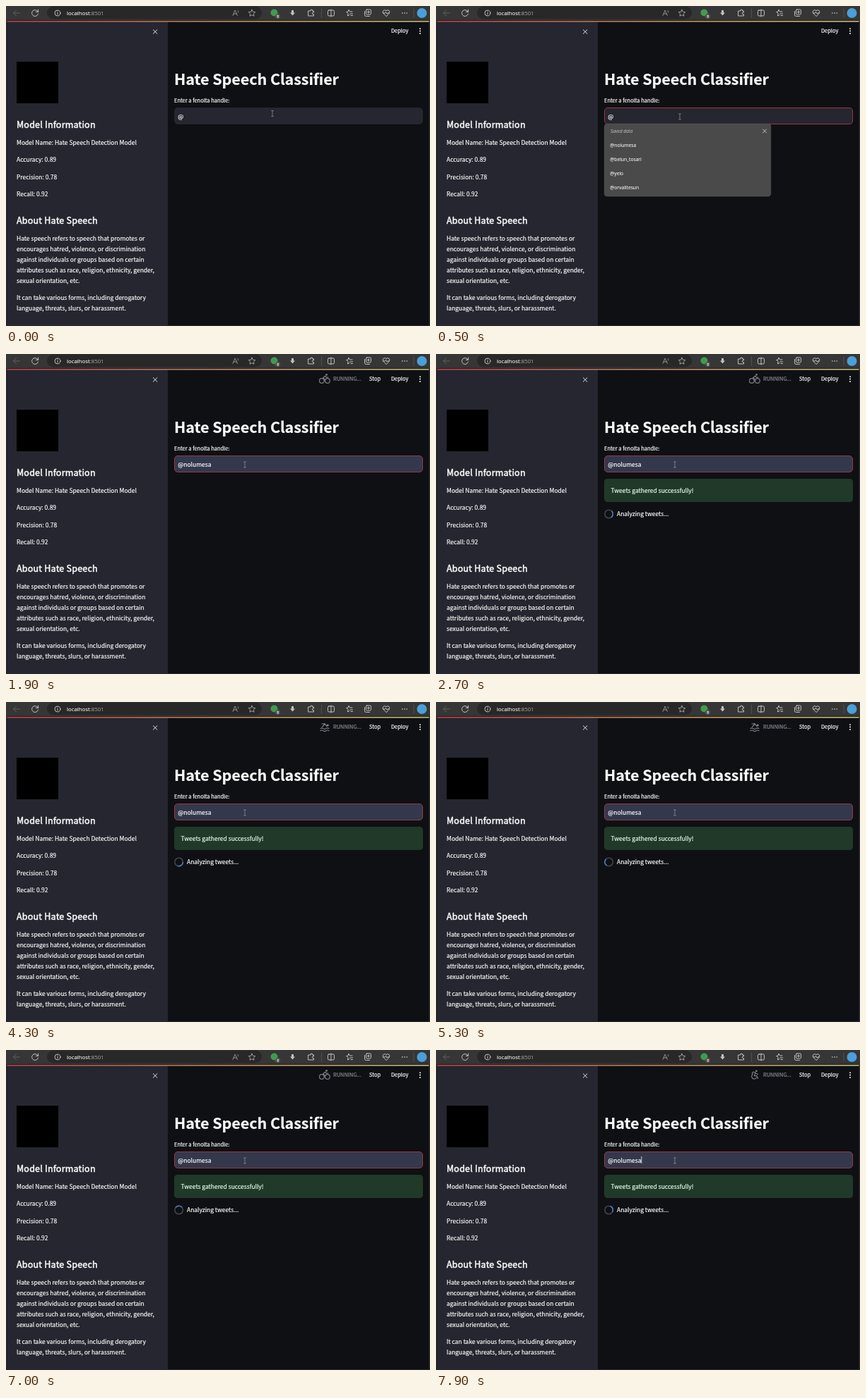
An HTML page for the animation above (8 s loop, 600 by 454 pixels).

```html
<!DOCTYPE html>
<html lang="en">
<head>
<meta charset="utf-8">
<title>Hate Speech Classifier</title>
<style>
html, body { margin: 0; width: 100%; height: 100%; overflow: hidden; background: #2a2a2c; }
svg { display: block; width: 100vw; height: 100vh; }
text { font: 8.47px "Noto Sans CJK JP", "Noto Sans CJK", "Noto Sans CJK SC", "Open Sans", sans-serif; color: #fafafa; fill: currentColor; stroke: currentColor; stroke-width: .2; white-space: pre; }
.small { font-size: 7.45px; }
.h1 { font-size: 21.55px; font-weight: 700; letter-spacing: -.1px; }
.h2 { font-size: 12.5px; letter-spacing: .21px; stroke-width: .5; }
.ui { font: 6.7px "Open Sans", "Noto Sans", sans-serif; stroke-width: .1; }
.line { fill: none; stroke: #d0d0d0; stroke-width: .9; stroke-linecap: round; stroke-linejoin: round; }
.sport { fill: none; stroke: #7c7d83; stroke-width: 1.2; stroke-linecap: round; stroke-linejoin: round; }
.dot { fill: #7c7d83; stroke: none; }
</style>
</head>
<body>
<svg viewBox="0 0 600 454" preserveAspectRatio="none">
  <defs>
    <linearGradient id="rainbow">
      <stop stop-color="#d8434b"/><stop offset=".5" stop-color="#d99a62"/><stop offset="1" stop-color="#dcd880"/>
    </linearGradient>
  </defs>

  <!-- browser toolbar -->
  <rect width="600" height="20.5" fill="#363636"/>
  <rect x="58" y="0.5" width="304" height="18" rx="9" fill="#282828"/>
  <g class="line">
    <path d="M19.5 10H10.5M14.5 6L10.5 10L14.5 14" stroke="#666"/>
    <path d="M45.2 8.2A4.5 4.5 0 1 0 45.5 11M45.6 5.2V8.4H42.4"/>
    <circle cx="73" cy="10" r="4"/><path d="M73 9.5V12M73 7.8V8"/>
    <path d="M321 13.5L324.2 6L327.4 13.5M322 11H326.4M328 6.5Q329.5 7.5 328.6 9" stroke="#999"/>
    <path d="M348 5.2L349.5 8.3L352.8 8.7L350.4 11L351 14.3L348 12.7L345 14.3L345.6 11L343.2 8.7L346.5 8.3Z" stroke="#aaa"/>
    <path d="M428 7H431A1.4 1.4 0 1 1 433.6 7H435.5V9A1.5 1.5 0 1 0 435.5 11.8V14H428Z"/>
    <path d="M446.5 4V16M577 4V16" stroke="#555"/>
    <rect x="455.5" y="6" width="9" height="8" rx="1.5"/><path d="M460 5V15"/>
    <path d="M485 5.5L486.4 8H490M482 8.5H483.6L485 5.5M482 8.5L484 10.5L483.5 14L486 12.7M487 11H490.5M488 13.5H490.5"/>
    <rect x="509.5" y="5" width="7" height="7" rx="1.2"/><path d="M507.5 7.5V12.5Q507.5 14.5 509.5 14.5H514.5M513 6.8V10.2M511.3 8.5H514.7"/>
    <path d="M538 14.5L533.8 10.2A2.5 2.5 0 0 1 538 6.8A2.5 2.5 0 0 1 542.2 10.2ZM534 10H536.5L537.5 8.5L539 11L540 10H542"/>
  </g>
  <circle cx="379.5" cy="9.5" r="5" fill="#3f9b51"/>
  <circle cx="384.5" cy="14.5" r="3.5" fill="#555"/>
  <text class="ui" x="383" y="16.8" style="font-size:5.8px;font-weight:700">1</text>
  <path d="M404 6H407V9.5H409L405.5 13.5L402 9.5H404Z" fill="#c0c0c0"/>
  <g fill="#ddd"><circle cx="560.8" cy="10" r=".8"/><circle cx="564" cy="10" r=".8"/><circle cx="567.2" cy="10" r=".8"/></g>
  <circle cx="588.5" cy="10" r="7" fill="#4b9fd8"/>
  <text class="ui" x="86" y="12.7" style="font-size:7.8px">localhost<tspan style="color:#999">:8501</tspan></text>

  <!-- page -->
  <rect x="1.5" y="20.5" width="597" height="432.5" fill="#0f1014"/>
  <rect x="1.5" y="22" width="227.5" height="431" fill="#25262f"/>
  <rect x="1.5" y="21.2" width="597" height="1.4" fill="url(#rainbow)"/>
  <path class="line" d="M208.3 33.7L213.9 39.3M213.9 33.7L208.3 39.3" style="stroke:#fafafa"/>
  <rect x="15" y="79" width="59" height="59"/>
  <g id="sidebar"></g>
  <text class="small" x="545" y="38.4">Deploy</text>
  <g fill="#fafafa"><circle cx="586" cy="32.2" r="1"/><circle cx="586" cy="35.6" r="1"/><circle cx="586" cy="39" r="1"/></g>
  <text class="h1" x="238" y="112.4">Hate Speech Classifier</text>
  <text class="small" x="238" y="137.4">Enter a fenolta handle:</text>
  <rect id="field" x="238.5" y="144.5" width="351" height="23" rx="4.5" stroke-width=".9"/>
  <text id="value" x="243.3" y="159.5"></text>
  <path id="caret" d="M290.8 151V161" stroke="#fafafa" stroke-width=".8"/>

  <!-- running status -->
  <g id="running">
    <g id="sports" class="sport">
      <g>
        <circle cx="446.8" cy="38" r="3.3"/><circle cx="455" cy="38" r="3.3"/>
        <path d="M451 38.5V35.4L448.6 33.8L451.6 31.2L453.4 33.2H455.8"/>
        <circle class="dot" cx="453.6" cy="29.4" r="1.4"/>
      </g>
      <g>
        <path d="M447 31L451 30.6L454 34.6M451 31.8L447.6 35"/>
        <circle class="dot" cx="455.2" cy="33" r="1.6"/>
        <path d="M445 37.6Q447 36 449 37.6T453 37.6T457 37.6M445 40.8Q447 39.2 449 40.8T453 40.8T457 40.8"/>
      </g>
      <g>
        <path d="M448.4 34.2A3.7 3.7 0 1 0 453.6 39.2M452 31.6L450.4 36.6H454L455.6 40.4M452 32L448.8 31.2L447.2 33.2M452 33L455.4 34.4"/>
        <circle class="dot" cx="453.4" cy="29.8" r="1.4"/>
      </g>
    </g>
    <text class="small" x="463" y="38.4" style="color:#85868c">RUNNING...</text>
    <text class="small" x="514" y="38.4">Stop</text>
  </g>

  <!-- result -->
  <g id="result">
    <rect x="238" y="177" width="352" height="33" rx="4.5" fill="#203928"/>
    <text x="247.6" y="197.1" style="color:#dffde9">Tweets gathered successfully!</text>
    <g fill="none" stroke-width="1.5">
      <circle cx="244.6" cy="227" r="5.8" stroke="#44464e"/>
      <path id="arc" d="M248.7 222.9A5.8 5.8 0 0 1 248.7 231.1" stroke="#4a7fc4" stroke-linecap="round"/>
    </g>
    <text x="256" y="230.4">Analyzing tweets...</text>
  </g>

  <!-- autofill list -->
  <g id="list">
    <rect x="238.2" y="167.2" width="235.6" height="102.8" rx="4" fill="#4a4a4a" stroke="#5c5c5c" stroke-width=".5"/>
    <rect id="hover" x="241" y="188" width="230" height="19.5" rx="2" fill="#757575"/>
    <text class="ui" x="247" y="180" style="font-size:6.4px;font-style:italic;color:#b4b4b4">Saved data</text>
    <path class="line" d="M462.5 175L467.5 180M467.5 175L462.5 180"/>
    <g id="names"></g>
  </g>

  <g id="pointer">
    <path id="beam" d="M-1.8 -4H1.8M0 -4V4M-1.8 4H1.8" stroke="#999" stroke-width=".7" fill="none"/>
    <path id="arrow" d="M0 0V8.2L1.9 6.5L3.2 9.3L4.5 8.7L3.2 6H5.8Z" fill="#fff" stroke="#222" stroke-width=".4"/>
  </g>
</svg>
<script>
const $ = id => document.getElementById(id);
const show = (el, on) => el.style.display = on ? "" : "none";

const addText = (parent, cls, x, y, str) => {
  const el = document.createElementNS("http://www.w3.org/2000/svg", "text");
  el.setAttribute("class", cls);
  el.setAttribute("x", x);
  el.setAttribute("y", y);
  el.textContent = str;
  parent.append(el);
};

const handles = ["@nolumesa", "@belun_tosari", "@yelo", "@orvalitesun"];
handles.forEach((name, i) => addText($("names"), "ui", 246.3, 200.3 + i * 20, name));

const sidebar = [
  [172.8, "Model Information", "h2"],
  [196.7, "Model Name: Hate Speech Detection Model"],
  [221.1, "Accuracy: 0.89"],
  [245.6, "Precision: 0.78"],
  [270.1, "Recall: 0.92"],
  [308.8, "About Hate Speech", "h2"],
  [332.7, "Hate speech refers to speech that promotes or"],
  [347.8, "encourages hatred, violence, or discrimination"],
  [362.8, "against individuals or groups based on certain"],
  [377.8, "attributes such as race, religion, ethnicity, gender,"],
  [392.9, "sexual orientation, etc."],
  [417.4, "It can take various forms, including derogatory"],
  [432.4, "language, threats, slurs, or harassment."]
];
sidebar.forEach(([y, str, cls = ""]) => addText($("sidebar"), cls, 15, y, str));

// time, x, y
const path = [[0, 377, 152.5], [200, 377, 152.5], [500, 345, 157], [700, 338, 160],
  [1000, 323, 193], [1400, 323, 193], [1700, 338, 157], [8000, 338, 157]];

function pointerAt(t) {
  const i = path.findIndex(p => p[0] > t);
  const [t0, x0, y0] = path[i - 1], [t1, x1, y1] = path[i];
  const u = (t - t0) / (t1 - t0), e = u * u * (3 - 2 * u);
  return [x0 + (x1 - x0) * e, y0 + (y1 - y0) * e];
}

function draw(t) {
  const [x, y] = pointerAt(t);
  const focused = t >= 400, open = t >= 500 && t < 1400, filled = t >= 1400;
  const hover = open && y > 187, arrow = open && y > 167;

  $("pointer").setAttribute("transform", `translate(${x} ${y})`);
  show($("arrow"), arrow);
  show($("beam"), !arrow);
  show($("list"), open);
  show($("hover"), hover);

  $("field").setAttribute("fill", hover || filled ? "#33384c" : "#25262f");
  $("field").setAttribute("stroke", focused ? "#a53a48" : "#25262f");
  $("value").textContent = hover || filled ? handles[0] : "@";
  $("value").setAttribute("class", hover ? "ui" : "");
  const blink = t % 1060;
  show($("caret"), filled && blink > 65 && blink < 575);

  show($("running"), t >= 1800);
  const sport = Math.floor((t + 470) % 1050 / 350);
  [...$("sports").children].forEach((icon, i) => show(icon, i === sport));

  show($("result"), t >= 2300);
  $("arc").setAttribute("transform", `rotate(${5 + (t - 2700) * .48} 244.6 227)`);
}

const start = performance.now();
function tick(now) {
  const t = Math.max(0, now - start) % 8000;
  draw(Math.floor(t / 100) * 100);
  requestAnimationFrame(tick);
}
tick(start);
</script>
</body>
</html>
```
